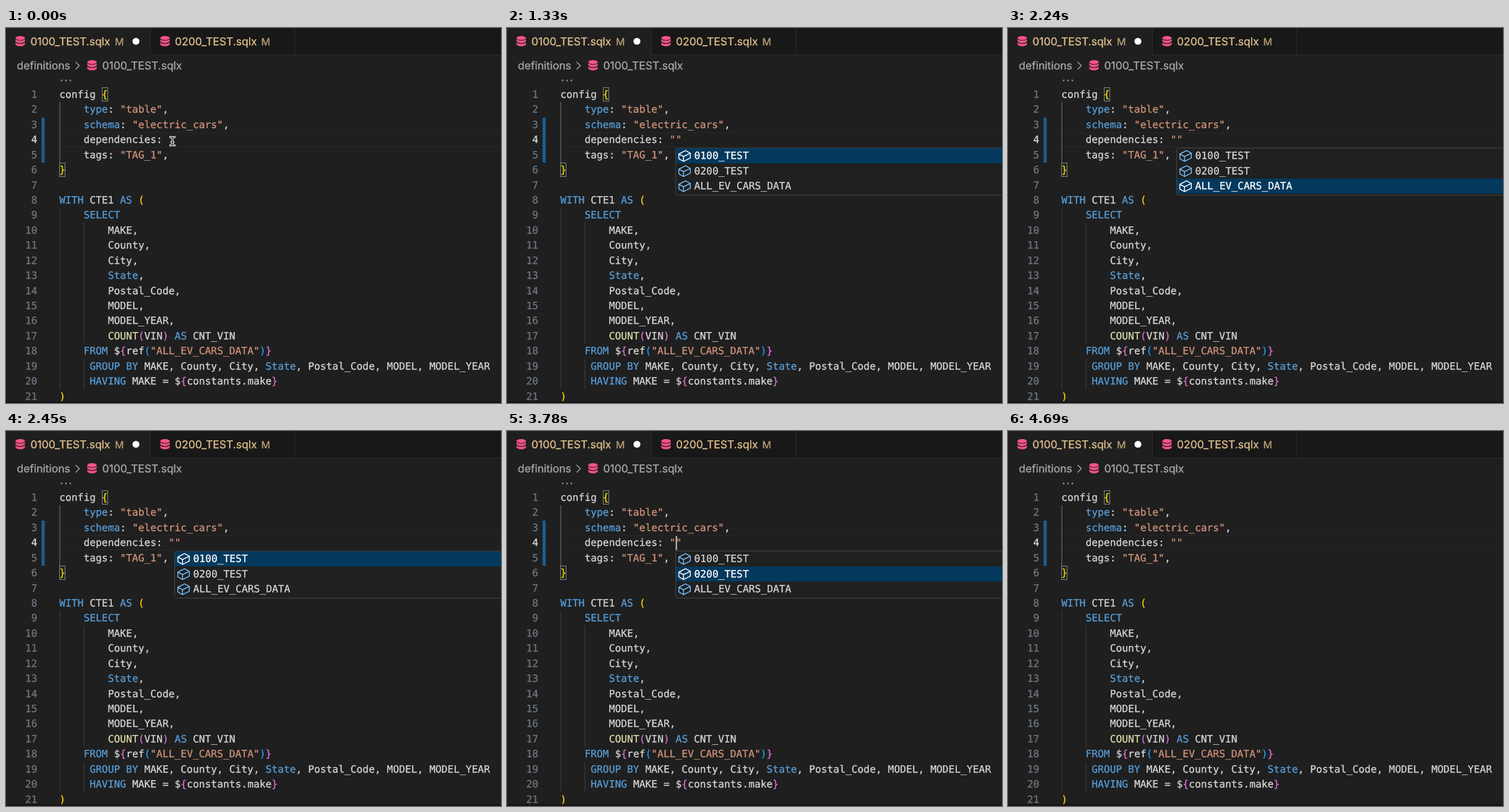
These frames come from a looping animation (800 by 607 pixels, 4760 ms). An HTML page:

```html
<!DOCTYPE html>
<html lang="en">
<head>
<meta charset="utf-8">
<title>Dependency completion</title>
<style>
html, body { margin: 0; width: 100%; height: 100%; overflow: hidden; background: #1f1f1f; }
svg { display: block; width: 800px; height: 607px; }
text { white-space: pre; text-rendering: geometricPrecision; }
text, tspan { fill: currentColor; stroke: currentColor; stroke-width: .3; }
.ui { font: 17.5px Inter, sans-serif; }
.mono { font: 16.3px "DejaVu Sans Mono", monospace; color: #d4d4d4; }
.kw { color: #569cd6; }
.fn { color: #dcdcaa; }
.str { color: #ce9178; }
.num { color: #6e7681; text-anchor: end; }
.num.on { color: #d4d4d4; }
.tab { color: #e2c08d; }
.crumb { color: #a9a9a9; }
.line { fill: none; stroke: #2b2b2b; }
.guide { fill: none; stroke: #404040; }
.guide.on { stroke: #686868; }
.cube { fill: none; stroke: #75beff; stroke-width: 1.5; stroke-linejoin: round; }
.pick { color: #fff; }
.pick .cube { stroke: #fff; }

.pick, #mouse, #start, #caret, #quotes, #popup { animation: 4760ms step-end infinite; }
#mouse { animation-name: mouse; }
#start { animation-name: start; }
#quotes { animation-name: quotes; }
#popup { animation-name: popup; }
#caret { animation-name: blink; }
#pick0 { animation-name: pick0; }
#pick1 { animation-name: pick1; }
#pick2 { animation-name: pick2; }
@keyframes mouse { 0% { opacity: 1 } 13.235%, 100% { opacity: 0 } }
@keyframes start { 0% { opacity: 0 } 1.47% { opacity: 1 } 11.76%, 100% { opacity: 0 } }
@keyframes quotes { 0% { opacity: 0 } 13.235%, 100% { opacity: 1 } }
@keyframes popup { 0% { opacity: 0 } 13.235% { opacity: 1 } 88.235%, 100% { opacity: 0 } }
@keyframes blink {
  0%, 23.53%, 45.59%, 66.18%, 88.235%, 100% { opacity: 0 }
  13.235%, 35.29%, 55.88%, 76.47% { opacity: 1 }
}
@keyframes pick0 { 0%, 48.53% { opacity: 1 } 36.76%, 67.65%, 100% { opacity: 0 } }
@keyframes pick1 { 0%, 39.7% { opacity: 0 } 36.76%, 67.65%, 100% { opacity: 1 } }
@keyframes pick2 { 0%, 48.53%, 100% { opacity: 0 } 39.7% { opacity: 1 } }
</style>
</head>
<body>
<svg viewBox="0 0 800 607">
  <defs>
    <g id="db" fill="#f55385">
      <ellipse cx="8" cy="3.2" rx="7.6" ry="3.2"/>
      <path id="disc" d="M.4 5.2Q3 7.6 8 7.6T15.6 5.2V8.6Q13.5 11.4 8 11.4T.4 8.6Z"/>
      <use href="#disc" y="5.2"/>
    </g>
    <path id="cube" d="M277.7-3 288.6-8.6 296.3-4.4V3.4L285.3 8.8 277.7 4.6ZL285.3 1 296.3-4.4M285.3 1V8.8"/>
    <path id="beam" d="M265.5 176.5Q268.5 176.5 269 179 269.5 176.5 272.5 176.5M269 179V187.5M265.5 190Q268.5 190 269 187.5 269.5 190 272.5 190M267.3 185H270.7"/>
    <pattern id="hatch" x="2" width="4" height="4" patternUnits="userSpaceOnUse">
      <path d="M-1 1 1-1M0 4 4 0M3 5 5 3" stroke="#1a85d6" stroke-width="1.7"/>
    </pattern>
  </defs>

  <rect width="800" height="607" fill="#1f1f1f"/>
  <rect x="233" width="567" height="44" fill="#181818"/>
  <path class="line" d="M233.5 0V43.5H800M466.5 0V43"/>
  <use href="#db" x="15" y="13"/>
  <use href="#db" x="249" y="13"/>
  <use href="#db" x="131" y="52"/>
  <g class="ui">
    <g class="tab">
      <text x="39.5" y="28">0100_TEST.sqlx</text>
      <text x="273" y="28">0200_TEST.sqlx</text>
      <g font-size="16" opacity=".8">
        <text x="176" y="27.5">M</text>
        <text x="412.5" y="27.5">M</text>
      </g>
    </g>
    <g class="crumb">
      <text x="17.5" y="66.5">definitions</text>
      <text x="155.5" y="66.5">0100_TEST.sqlx</text>
    </g>
  </g>
  <circle cx="210" cy="21.5" r="5.6" fill="#fff"/>
  <path d="M112.5 55 118.5 61 112.5 67" fill="none" stroke="#a9a9a9" stroke-width="1.4"/>
  <g fill="#8c8c8c">
    <circle cx="90" cy="85" r="1.4"/><circle cx="97" cy="85" r="1.4"/><circle cx="104" cy="85" r="1.4"/>
  </g>

  <path class="line" d="M86 169.5H800M86 192.5H800" opacity=".8"/>
  <rect x="57.5" y="145" width="5" height="73" fill="url(#hatch)"/>
  <path class="guide on" d="M87 120V218" stroke-width="1.2"/>
  <path class="guide" d="M87 291V584M126 315V511M126 536V584"/>
  <g fill="#1d251d" stroke="#888">
    <rect x="155.5" y="96.5" width="9" height="22"/>
    <rect x="86.5" y="218.5" width="9" height="22"/>
  </g>
  <g class="mono">
    <g id="code"></g>
    <text id="quotes" class="str">""</text>
    <g id="popup">
      <rect x="272.5" y="194.5" width="540" height="76" rx="3" fill="#202020" stroke="#454545"/>
    </g>
  </g>
  <rect id="start" x="262.5" y="170" width="2" height="23" fill="#c8c8c8"/>
  <rect id="caret" x="272.7" y="170" width="2" height="23" fill="#c8c8c8"/>
  <g id="mouse" fill="none" stroke-linecap="round">
    <use href="#beam" stroke="#eee" stroke-width="3.4"/>
    <use href="#beam" stroke="#222" stroke-width="1.2"/>
  </g>
  <rect y="604" width="800" height="3" fill="#191418"/>
</svg>
<script>
const LEFT = 86.2, COL = 9.813, TOP = 113, ROW = 24.43;
const BRACKETS = ['#ffd700', '#da70d6', '#179fff'];
const TOKENS = /"[^"]*"|\b(?:WITH|AS|SELECT|FROM|GROUP BY|HAVING|State|type|schema)\b|COUNT|[{}()]/g;
const source = `config {
    type: "table",
    schema: "electric_cars",
    dependencies:
    tags: "TAG_1",
}

WITH CTE1 AS (
    SELECT
        MAKE,
        County,
        City,
        State,
        Postal_Code,
        MODEL,
        MODEL_YEAR,
        COUNT(VIN) AS CNT_VIN
    FROM \${ref("ALL_EV_CARS_DATA")}
     GROUP BY MAKE, County, City, State, Postal_Code, MODEL, MODEL_YEAR
     HAVING MAKE = \${constants.make}
)`;
const byId = id => document.getElementById(id);
const colX = col => LEFT + col * COL;
const rowY = row => TOP + row * ROW;

let depth = 0;
function paint(token) {
  const bracket = level => `<tspan color="${BRACKETS[level]}">${token}</tspan>`;
  if ('{('.includes(token)) return bracket(depth++);
  if ('})'.includes(token)) return bracket(--depth);
  const kind = token[0] === '"' ? 'str' : token === 'COUNT' ? 'fn' : 'kw';
  return `<tspan class="${kind}">${token}</tspan>`;
}

byId('code').innerHTML = source.split('\n').map((line, i) => {
  const body = line.trimStart();
  return `<text class="num${i === 3 ? ' on' : ''}" x="50.5" y="${rowY(i)}">${i + 1}</text>` +
    `<text x="${colX(line.length - body.length)}" y="${rowY(i)}">${body.replace(TOKENS, paint)}</text>`;
}).join('');
byId('quotes').setAttribute('x', colX(18));
byId('quotes').setAttribute('y', rowY(3));

const item = (name, y) =>
  `<use class="cube" href="#cube" y="${y}"/><text x="302.5" y="${y + 5}">${name}</text>`;
byId('popup').innerHTML += ['0100_TEST', '0200_TEST', 'ALL_EV_CARS_DATA'].map((name, i) => {
  const y = 207 + i * 24.5;
  return item(name, y) + `<g class="pick" id="pick${i}">` +
    `<rect x="273" y="${y - 12.3}" width="527" height="24.5" fill="#04395e"/>${item(name, y)}</g>`;
}).join('');
</script>
</body>
</html>
```
